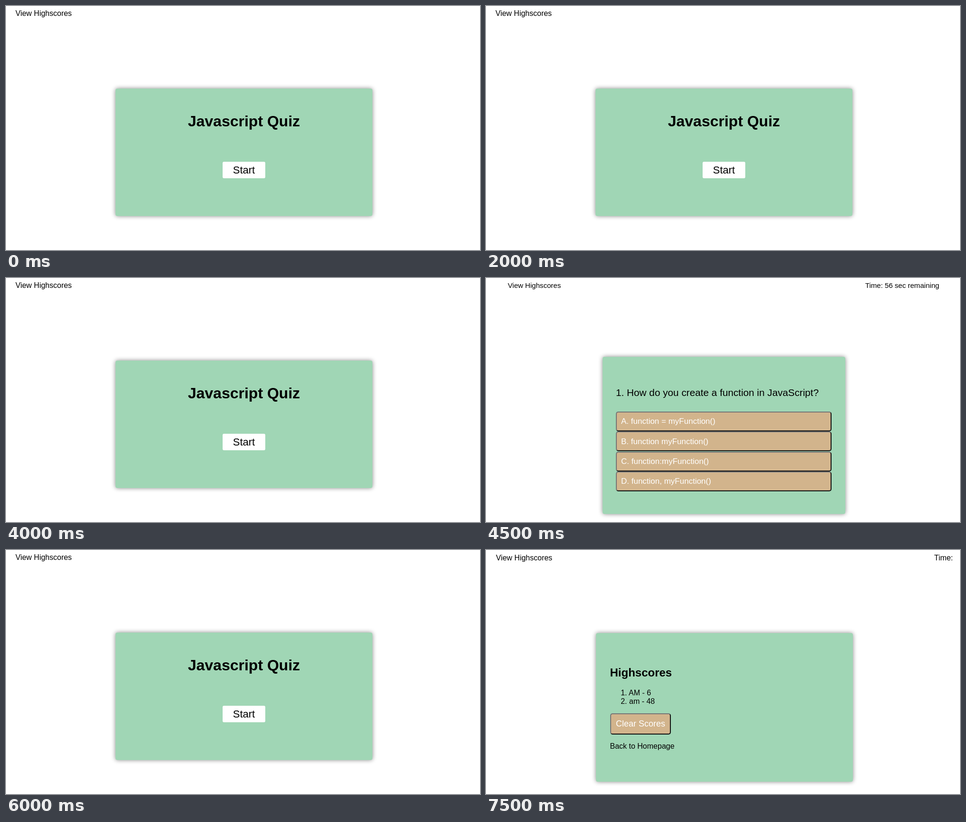
An HTML page that plays this animation: 1000x517 px, repeating every 8000 ms.

```html
<!DOCTYPE html>
<html lang="en">
<head>
<meta charset="utf-8">
<title>Javascript Quiz</title>
<style>
  html, body { margin: 0; width: 100%; height: 100%; overflow: hidden; background: #fff; }
  .scene { position: absolute; left: 0; top: 0; width: 1000px; height: 517px; overflow: hidden; visibility: hidden; }
  .scene div { position: absolute; box-sizing: border-box; }
  .scene svg { position: absolute; left: 0; top: 0; }
  .card { background: #a0d6b5; border-radius: 4px; box-shadow: 0 0 10px #888; }
  .start { background: #fff; border-radius: 3px; }
  .btn { background: #d2b48c; border: 2px solid; border-color: #767676 #111 #111 #767676; border-radius: 5px; }
  .input { background: #fff; border: 2px solid #1a5cc0; border-radius: 3px; box-shadow: 0 0 0 1px #fff; }
  text { font-family: "Liberation Sans", Arial, Helvetica, sans-serif; white-space: pre; }
</style>
</head>
<body>
<script>
const STEP = 500;
const NS = "http://www.w3.org/2000/svg";

// box: [class, left, top, right, bottom]
// label: [text, x, baseline, size, style]
function scene(boxes, labels) {
  const root = document.createElement("div");
  root.className = "scene";
  for (const [kind, l, t, r, b] of boxes) {
    const el = document.createElement("div");
    el.className = kind;
    el.style.cssText = `left:${l}px;top:${t}px;width:${r - l}px;height:${b - t}px`;
    root.append(el);
  }
  const svg = document.createElementNS(NS, "svg");
  svg.setAttribute("width", 1000);
  svg.setAttribute("height", 517);
  for (const [str, x, y, size, style = {}] of labels) {
    const el = document.createElementNS(NS, "text");
    const attrs = { x, y, "font-size": size, fill: "#000", ...style };
    for (const key in attrs) el.setAttribute(key, attrs[key]);
    el.textContent = str;
    svg.append(el);
  }
  root.append(svg);
  document.body.append(root);
  return root;
}

const white = { fill: "#fff" };
const bold = { "font-weight": "bold" };
const mid = { "text-anchor": "middle" };
const link = "View Highscores";

const options = [
  "A. function = myFunction()",
  "B. function myFunction()",
  "C. function:myFunction()",
  "D. function, myFunction()"
];
const rowY = i => 283 + i * 42.4;

const scenes = [
  scene([
    ["card", 231, 175, 773, 445],
    ["start", 457, 330, 547, 365]
  ], [
    [link, 20, 21, 16],
    ["Javascript Quiz", 502, 255, 32, { ...bold, ...mid }],
    ["Start", 502, 355, 22, mid]
  ]),
  scene([
    ["card", 245.5, 166.5, 757.5, 499.5],
    ...options.map((_, i) => ["btn", 274, rowY(i), 729, rowY(i) + 42])
  ], [
    [link, 46, 21, 15.08],
    ["Time: 56 sec remaining", 800, 21, 15.08],
    ["1. How do you create a function in JavaScript?", 274, 250, 20.76],
    ...options.map((str, i) => [str, 285, rowY(i) + 26.2, 17, white])
  ]),
  scene([
    ["card", 239, 168, 762.5, 502],
    ["input", 278, 327.5, 425.5, 347.5],
    ["btn", 278, 348.5, 405.5, 391],
    ["btn", 278, 391.5, 431.5, 438]
  ], [
    [link, 36, 19.5, 15.44],
    ["Time: 0 sec remaining", 814.6, 19.5, 15.44],
    ["User Score", 501, 272.5, 30.9, { ...bold, ...mid }],
    ["AM", 281.7, 342, 12.9],
    ["Submit Score", 289.5, 375, 17.37, white],
    ["See High Scores", 289.5, 420, 17.37, { fill: "#555" }]
  ]),
  scene([
    ["card", 232, 176, 774, 491],
    ["btn", 262, 346, 390, 391]
  ], [
    [link, 21, 22, 16],
    ["Time:", 945.6, 22, 16],
    ["Highscores", 261.5, 268, 24, bold],
    ["1. AM - 6", 284.2, 308, 16],
    ["2. am - 48", 284.2, 326, 16],
    ["Clear Scores", 274, 374, 18, white],
    ["Back to Homepage", 261.5, 421, 16]
  ])
];

const begin = performance.now();
function draw(now) {
  const t = Math.max(0, now - begin);
  const current = Math.floor(t / STEP) % scenes.length;
  scenes.forEach((el, i) => { el.style.visibility = i === current ? "visible" : "hidden"; });
  requestAnimationFrame(draw);
}
draw(begin);
</script>
</body>
</html>
```
